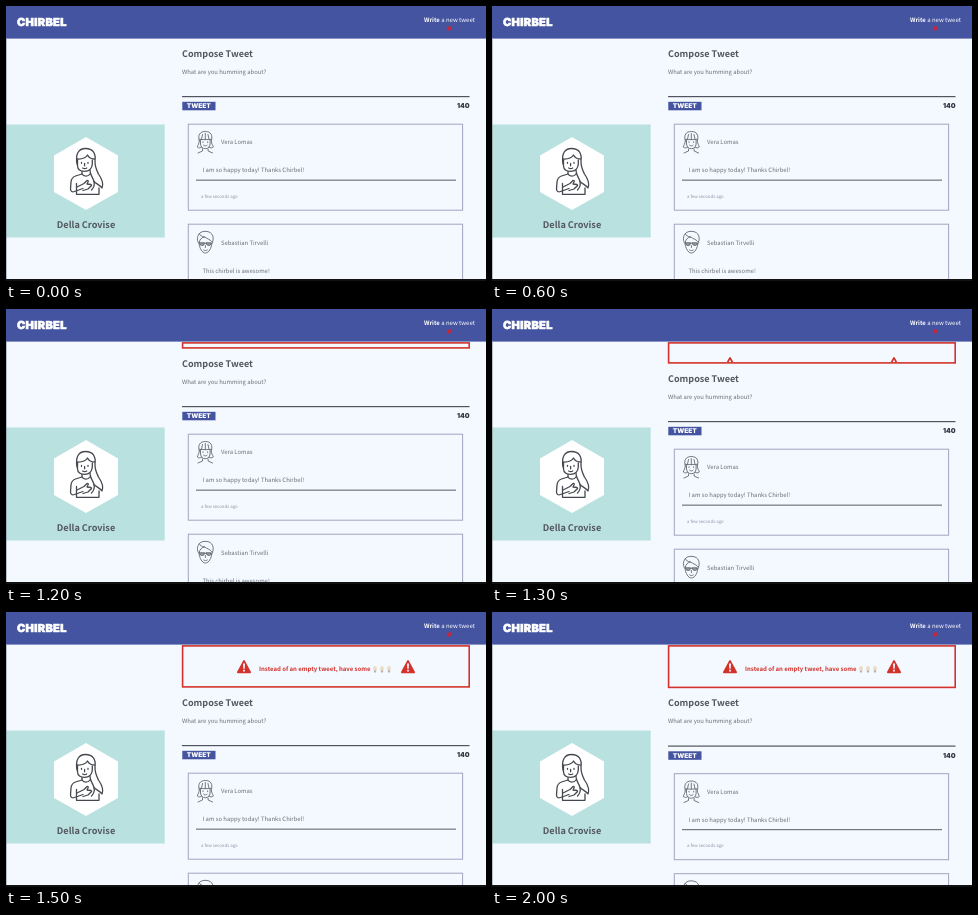
An HTML page for the animation above (2.4 s loop, 480 px wide and 275 px high).

```html
<!DOCTYPE html>
<html lang="en">
<head>
<meta charset="utf-8">
<title>Compose Tweet</title>
<style>
  html, body { margin: 0; width: 100%; height: 100%; overflow: hidden; background: #f4f8ff; }
  svg { display: block; width: 480px; height: 275px; }
  text {
    font: 300 5.92px "Noto Sans CJK JP", "Noto Sans CJK SC", "Noto Sans", sans-serif;
    fill: #6b6f79; text-rendering: geometricPrecision; white-space: pre;
  }
  .title { font-size: 9.05px; font-weight: 700; fill: #53575f; }
  .strong { font-weight: 700; }
  .age { font-size: 4.35px; font-weight: 400; fill: #8f94a6; }
  .block { font-family: Inter, "DejaVu Sans", sans-serif; font-weight: 900; }
  .logo { font-size: 11px; letter-spacing: .35px; fill: #fff; stroke: #fff; stroke-width: .6; }
  .button { font-size: 6.5px; fill: #fff; }
  .count { font-size: 6.8px; fill: #343845; }
  .card { fill: none; stroke: #a0a6c0; }
  .ink { fill: none; stroke: #45484e; stroke-width: 1.3; stroke-linecap: round; stroke-linejoin: round; }
  .fine { stroke-width: .8; stroke: #55585f; }
  .alert-text { fill: #d3322a; font-weight: 700; font-size: 6px; }
</style>
</head>
<body>
<svg viewBox="0 0 480 275">
  <defs>
    <clipPath id="reveal"><rect id="window" x="178" y="35" width="284" height="0"/></clipPath>
    <g id="warning">
      <path d="M0-5.6L6 5.6H-6Z" fill="#d3322a" stroke="#d3322a" stroke-width="2" stroke-linejoin="round"/>
      <path d="M-1-3.2H1L.7 2H-.7ZM-.9 3.1H.9V4.8H-.9Z" fill="#f4f8ff"/>
    </g>
    <g id="hand">
      <ellipse rx="1.9" ry="2.5" cy="-.6" fill="#eadcc4"/>
      <path d="M-1.3 1.2H1.3L.9 3.2H-.9Z" fill="#b9b2a8"/>
    </g>
  </defs>

  <rect width="480" height="275" fill="#f4f8ff"/>

  <!-- profile -->
  <rect y="118.5" width="158.7" height="113" fill="#b9e1df"/>
  <path d="M80 131L112 149.5V186L80 204L48 186V149.5Z" fill="#fff"/>
  <g class="ink">
    <path d="M71 158C69.3 148 72.5 142.5 79.5 142.5C87 142.5 90 147.5 89 155C88.8 161 90.5 164 92.5 168C96 173 98 177 96 182C94 179 90.5 178 88 175.5"/>
    <path d="M71 153C75 153.3 79.5 152 81.5 149C83 152 85.5 153 88.5 153"/>
    <path d="M71.5 154V160C71.8 163.5 74.5 165.3 78.5 165.3C83 165.3 86 162.5 86.3 158V154"/>
    <path d="M75.5 156.3V157.3M82 156.3V157.3M78.6 157.5V159.8M76.7 162C78 162.8 79.5 162.8 80.7 162"/>
    <path d="M76 165.3V168L69.5 170C66.5 171 65.3 173 65 176L64.5 183C64.5 185.5 66.3 186.3 68.5 185.5L77 182.5"/>
    <path d="M84 164.5C84 169 87 171.5 88 175.5C88.8 179 87.5 182 85.5 184"/>
    <path d="M76 168C77.5 170.8 82 171 84 168M70.5 177.5V188.3H93V182"/>
    <path d="M71 181L78 177.5L81 174.5C82 174 82.6 175 82 176L81 178L85 178.5C86 179 85.5 180 84.8 180.2L82 183L77 184.5"/>
  </g>
  <text class="title" x="80" y="222" text-anchor="middle" style="font-size:9.15px">Della Crovise</text>
  <rect y="33" width="1" height="242" fill="#7d8790" opacity=".5"/>

  <!-- feed -->
  <g id="feed">
    <text class="title" x="176" y="50.7">Compose Tweet</text>
    <text x="176" y="67.6">What are you humming about?</text>
    <rect x="176" y="90" width="287.5" height="1.2" fill="#50545f"/>
    <rect x="176.3" y="95.8" width="33.2" height="8.5" fill="#4454a0"/>
    <text class="block button" x="192.8" y="102.4" text-anchor="middle">TWEET</text>
    <text class="block count" x="463.7" y="102.3" text-anchor="end">140</text>

    <rect class="card" x="182.3" y="118.2" width="274.3" height="86"/>
    <g class="ink fine">
      <path d="M193.3 135C191.5 129 194 125.5 199.3 125.5C204.8 125.5 207 129 205.3 135C205.5 138 206.8 139 207.3 141C206 142.3 204 142 203 141.3"/>
      <path d="M193.3 135C193.1 138 191.8 139 191.3 141C192.6 142.3 194.6 142 195.6 141.3"/>
      <path d="M193.4 133.3C197 133.8 201.5 133.8 205.2 133.3M195.5 133.3L196.5 128.5M199.3 133.5V127.5M203 133.3L202 128.5"/>
      <path d="M194.5 134V138C194.8 141 196.6 142.7 199.3 142.7C202 142.7 203.8 141 204.1 138V134"/>
      <path d="M197 135.8V136.5M201.6 135.8V136.5M197.6 139.2C198.7 140.2 200 140.2 201.1 139.2M196.5 143V145L192 147M202.1 143V145L206.6 147"/>
    </g>
    <text x="215" y="138">Vera Lomas</text>
    <text x="196.5" y="166.2">I am so happy today! Thanks Chirbel!</text>
    <rect x="190" y="173.6" width="260" height="1.1" fill="#666a76"/>
    <text class="age" x="195" y="191.5">a few seconds ago</text>

    <rect class="card" x="182.3" y="218.2" width="274.3" height="86"/>
    <g class="ink fine">
      <path d="M193 237.5C190 235 190.5 225.3 199 225.3C208 225.3 208.5 233 205.8 238"/>
      <path d="M193 237.5C193.5 242 196 247 199.4 247C203 247 205.3 242 205.8 238"/>
      <path d="M193.3 236.5C193.5 233.5 195.5 231.5 198.5 231C201.5 233 204.5 233.5 206.3 236M198.5 231C195.5 230.5 194 229.3 193.3 228"/>
      <path d="M197.7 244C198.9 244.8 200.1 244.8 201.3 244M199.4 239.5V241.5"/>
      <path d="M193.5 236.8H198.3V238C198 240 194.3 240 193.7 238ZM200.5 236.8H205.3L205 238C204.5 240 201 240 200.5 238ZM198.3 237.2H200.5" fill="#9a9ca3"/>
    </g>
    <text x="215" y="238.5">Sebastian Tirvelli</text>
    <text x="196.5" y="266.7">This chirbel is awesome!</text>
    <rect x="190" y="273.6" width="260" height="1.1" fill="#666a76"/>
  </g>

  <!-- alert -->
  <g id="alert">
    <rect id="frame" x="176.6" y="33.9" width="286.6" height="0" fill="#f4f8ff" stroke="#d3322a" stroke-width="1.6"/>
    <g clip-path="url(#reveal)">
      <use href="#warning" x="238" y="54.7"/>
      <use href="#warning" x="402" y="54.7"/>
      <text class="alert-text" x="253" y="59.4">Instead of an empty tweet, have some</text>
      <use href="#hand" x="369" y="57.2"/>
      <use href="#hand" x="376" y="57.2"/>
      <use href="#hand" x="383" y="57.2"/>
    </g>
  </g>

  <!-- header -->
  <rect width="480" height="32.6" fill="#4454a0"/>
  <text class="block logo" x="11" y="20">CHIRBEL</text>
  <text x="418" y="16.3" style="fill:#fff;font-size:6px"><tspan class="strong">Write</tspan> a new tweet</text>
  <path d="M441 20.5L443 22L445 20.5M441 22.3L443 24L445 22.3" fill="none" stroke="#cb2434" stroke-width="1.4"/>
  <rect y="273" width="480" height="2" fill="#111"/>
</svg>
<script>
  const LOOP = 2400;
  // [start in ms, alert height in px]
  const STEPS = [[0, 0], [1200, 7], [1300, 22], [1400, 37], [1500, 43], [1600, 43.5]];
  const $ = id => document.getElementById(id);
  const feed = $('feed'), alertBox = $('alert'), frame = $('frame'), reveal = $('window');

  function draw(time) {
    const height = STEPS.filter(([start]) => start <= time).pop()[1];
    feed.setAttribute('transform', `translate(0 ${height})`);
    alertBox.style.display = height ? '' : 'none';
    frame.setAttribute('height', Math.max(0, height - 2));
    reveal.setAttribute('height', Math.max(0, height - 4));
  }

  const origin = performance.now();
  function tick() {
    draw((performance.now() - origin) % LOOP);
    requestAnimationFrame(tick);
  }
  tick();
</script>
</body>
</html>
```
